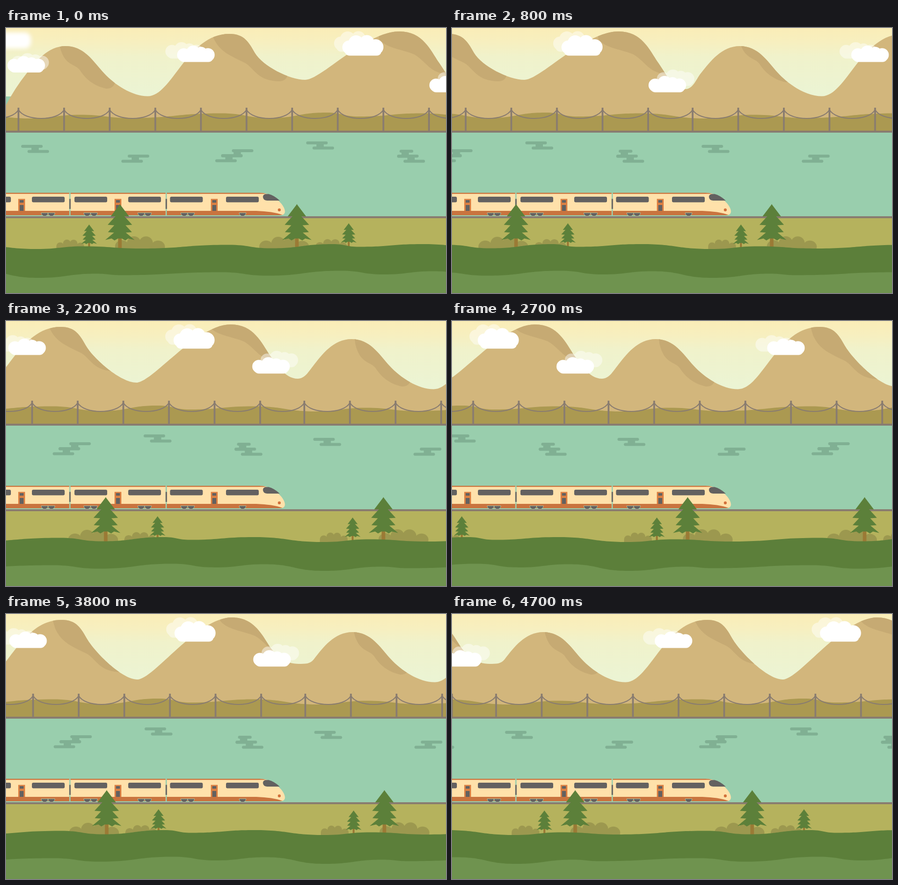
An HTML page that plays this animation: 900x542 px, repeating every 4.8 s.

```html
<!DOCTYPE html>
<html lang="en">
<head>
<meta charset="utf-8">
<title>Train by the lake</title>
<style>
  html, body { margin: 0; width: 100%; height: 100%; overflow: hidden; background: #99cead; }
  svg { display: block; width: 900px; height: 542px; }
  .strip { animation: pass 4.8s steps(48) infinite; }
  @keyframes pass { to { transform: translateX(-2784px); } }
</style>
</head>
<body>
<svg viewBox="0 0 900 542">
  <defs>
    <linearGradient id="sky" x1="0" y1="0" x2="0" y2="1">
      <stop offset="0" stop-color="#faedb7"/>
      <stop offset=".2" stop-color="#f7efbf"/>
      <stop offset=".42" stop-color="#f0f2cb"/>
      <stop offset="1" stop-color="#ebf4d4"/>
    </linearGradient>
    <filter id="soft" x="-50%" y="-50%" width="200%" height="200%"><feGaussianBlur stdDeviation="4"/></filter>
    <clipPath id="massif"><path id="massifPath"/></clipPath>
    <g id="puff" fill="#fff">
      <circle cx="13.5" cy="-14.5" r="13.5"/>
      <circle cx="33" cy="-18.5" r="15"/>
      <circle cx="49" cy="-18" r="13"/>
      <circle cx="63" cy="-14.5" r="13.8"/>
      <path d="M13-16H66L72-4Q69 0 64 0H14Q8 0 5-5Z"/>
    </g>
    <g id="bigPuff" fill="#fff">
      <circle cx="14" cy="-17" r="14"/>
      <circle cx="28" cy="-26" r="15.5"/>
      <circle cx="50" cy="-28" r="14"/>
      <circle cx="68" cy="-17.5" r="16"/>
      <path d="M14-20H70L79-5Q76 0 70 0H15Q9 0 6-5Z"/>
    </g>
    <path id="halfTree" d="M-.3 0H0L19 25L9 24.5L25 42L11.500 43L24.500 57L12 58L30 73L17 70L11 74L4 70H-.3Z"/>
    <g id="tree" fill="#5c803a">
      <path fill="#9b7a35" d="M-3.7 66H3.7V92H-3.7Z"/>
      <use href="#halfTree"/>
      <use href="#halfTree" transform="scale(-1 1)"/>
    </g>
    <g id="door">
      <path fill="#db8043" d="M0 349.5H14V374H0Z"/>
      <path fill="#636160" d="M3 352H11V357.3H3ZM3 362H11V374H3Z"/>
    </g>
  </defs>

  <rect width="900" height="140" fill="url(#sky)"/>
  <g id="far" class="strip"></g>
  <rect y="214" width="900" height="172" fill="#99cead"/>
  <rect y="210" width="900" height="4" fill="#897c70"/>
  <g id="lake" class="strip" fill="#80b093"></g>
  <rect y="389" width="900" height="100" fill="#b5b25d"/>
  <rect y="385" width="900" height="4" fill="#897c70"/>

  <g id="train">
    <path fill="#ffe1aa" d="M0 337H129.5V383H0ZM132 337H326.5V383H132ZM329 337H518C538 337 549 346 557 353
      C566 361 571 370 570.5 376Q570 381 565 382.5L560 383H329Z"/>
    <path fill="#c9743f" d="M0 337H129.5V339.3H0ZM132 337H326.5V339.3H132ZM329 337H518Q526 337 533 339.3H329Z
      M0 374H129.5V383H0ZM132 374H326.5V383H132ZM329 374H512Q545 375 566 382.2L560 383H329Z"/>
    <path fill="#636160" d="M129.5 349.5H132.3V370H129.5ZM326.5 349.5H329.3V370H326.5Z
      M532 339.5H537Q548 342 560 353H534Q525.5 352 525.5 345Q526 340 532 339.5Z"/>
    <circle cx="559" cy="372" r="3" fill="#d2703a"/>
  </g>
  <g id="near" class="strip"></g>
</svg>

<script>
const $ = id => document.getElementById(id);
const add = (id, html) => $(id).insertAdjacentHTML('beforeend', html);

// The scenery repeats; each layer's later tiles start with a small lead
const PITCH = 930, TILES = [0, 1, 2, 3];
const base = (k, lead) => k ? k * PITCH + lead : 0;
const land = k => base(k, 0.7);
const tiled = (lead, draw) => TILES.map(k =>
  `<g transform="translate(${base(k, lead)})">${draw(k)}</g>`).join('');

// Rolling ground from its crests and dips, level at each of them
const rolling = (turns, floor) => {
  const p = [-1, ...TILES].flatMap(k => turns.map(([x, y]) => [x + land(k), y]));
  const curves = p.slice(1).map(([x, y], i) => {
    const [px, py] = p[i], mid = (px + x) / 2;
    return `C${mid} ${py} ${mid} ${y} ${x} ${y}`;
  });
  return `M${p[0]}${curves.join('')}V${floor}H${p[0][0]}Z`;
};

// Three peaks per tile; the depth of the two valleys varies
const VALLEYS = [[106, 125], [126, 118], [134, 102], [134, 118]];
const range = ([mid, end], dx) => [
  [62, 68, 85, 37, 122, 37], [160, 37, 178, 68, 200, 92], [222, 116, 258, 139.5, 290, 139.5],
  [340, 139.5, 370, 12, 457, 12], [488, 12, 497, 30, 509, 51], [525, 78, 580, mid, 612, mid],
  [645, mid, 735, 7, 805, 7], [852, 7, 868, 45, 885, 70], [897, 86, 915, end, 942, end],
  [957, end, 965, 102, 972.7, 93]
].map(c => 'C' + c.map((v, i) => i % 2 ? v : v + dx)).join('');
const massif = `M-12 212V180L0 158Q18 123 42 93${VALLEYS.map((v, k) => range(v, land(k))).join('')}V212Z`;
$('massifPath').setAttribute('d', massif);

// Shaded slopes, nudged differently in each tile
const SHADES = [
  ['M102-20L110 38C120 78 140 72 151 86C162 103 178 118 205 124Q220 124 223 111V-20Z',
    ['0 0', '11 -13', '20 10', '15 0']],
  ['M412-20L424 20C438 50 460 57 490 72C508 83 515 109 560 109Q574 108 576 95V-20Z',
    ['0 0', '10 -6', '20 10', '8 -6']],
  ['M755-20L764 24C780 42 812 44 835 54C862 70 865 92 906 95V-20Z',
    ['0 0', '-3 -12', '18 -9', '8 -9']]
];
add('far', `<path fill="#d2b67c" d="${massif}"/>
  <g fill="#c6aa73" clip-path="url(#massif)">${tiled(.7, k => SHADES.map(([d, nudge]) =>
    `<path d="${d}" transform="translate(${nudge[k]})"/>`).join(''))}</g>`);

const HILLS = [[52, 185], [150, 177.5], [255, 184], [440, 174.5], [540, 184], [655, 173], [722, 181], [850, 174.5]];
add('far', `<path fill="#ab9951" d="${rolling(HILLS, 213)}"/>`);

// Poles and the wires hanging between them
const poles = [-68, ...TILES.flatMap(k => Array.from({ length: 10 }, (_, i) => land(k) + 25.5 + i * 93.3))];
const wire = (a, b) => `M${a} 167C${a + 12} 191 ${b - 12} 191 ${b} 167`;
add('far', `<g fill="none" stroke="#897c70">
  <path stroke-width="3.6" d="${poles.map(x => `M${x} 163V212`).join('')}"/>
  <path stroke-width="2" d="${poles.slice(1).map((x, i) => wire(poles[i], x)).join('')}"/></g>`);

// Clouds, each with a pale twin behind it
const cloud = (x, y, dx, dy, shape = 'puff') =>
  `<use href="#${shape}" x="${x + dx}" y="${y + dy}" opacity=".45"/><use href="#${shape}" x="${x}" y="${y}"/>`;
add('far', tiled(.7, k => cloud(350, 69.5, -24, -7) + cloud(688, 56.5, -17, -8, 'bigPuff') +
  (k ? cloud(849, 107.5, 17, -13) : cloud(866, 131.5, 17, -13))));
add('far', cloud(3, 91, 8, -6) +
  '<rect x="-20" y="9" width="71" height="33" rx="13" fill="#fff" filter="url(#soft)"/>');

// A ripple is two bars, the lower one shifted, joined where they overlap
const ripple = (x, y, shift, w = 44) => {
  const bar = (bx, by) => `<rect x="${bx}" y="${by}" width="${w}" height="6" rx="3"/>`;
  return bar(x, y) + bar(x + shift, y + 10.5) +
    `<rect x="${x + (w + shift) / 2 - 7.5}" y="${y + 3}" width="15" height="10"/>`;
};
add('lake', tiled(13.5, () => ripple(31, 239, 13) + ripple(249, 259, -13) + ripple(462, 248, -22) +
  ripple(440, 258, -12) + ripple(614, 232, 13) + ripple(805, 249, -5, 28) + ripple(800, 259, 13)));

// Train doors, windows and wheels
const wheel = x => `<path d="M${x - 7} 378H${x + 7}A7 7 0 0 1 ${x - 7} 378Z"
  fill="#636160" stroke="#b9d3ad" stroke-width=".8"/>`;
add('train', [25, 222, 419].map(x => `<use href="#door" x="${x}"/>`).join('') +
  [-57, 53, 140, 250, 335.5, 450].map(x =>
    `<rect x="${x}" y="345" width="67" height="11.5" rx="3" fill="#636160"/>`).join('') +
  [79, 166, 276.5, 364.5].map(x => wheel(x) + wheel(x + 14)).join('') + wheel(484));

// Trees and bushes
const tree = (x, y, s) => `<use href="#tree" transform="translate(${x} ${y}) scale(${s})"/>`;
const bush = (x, w, h) => [0, 1, 2, 3].map(i => {
  const r = w * .16, top = 450 - h * Math.sin(Math.PI * (.22 + .19 * i));
  return `<rect x="${x + w * .28 * i}" y="${top}" width="${r * 2}" height="${460 - top}" rx="${r}"/>`;
}).join('');
add('near', tiled(-45, () => `<g fill="#9c984f">${
  bush(103, 49, 18) + bush(223, 88, 25) + bush(518, 88, 24) + bush(633, 56, 19)}</g>` +
  tree(170, 402, .54) + tree(233, 360.5, 1) + tree(595, 360.5, 1) + tree(701, 399.5, .54)));

// Foreground meadows
const DARK = [[63, 452], [160, 446.5], [275, 451], [455, 443.5], [542, 450.5], [668, 442], [722, 447.5], [852, 442]];
const LIGHT = [[65, 511], [185, 502.5], [235, 505.5], [440, 499.5], [535, 506.5], [685, 496.5], [772, 504], [875, 497.5]];
add('near', `<path fill="#5c7f3a" d="${rolling(DARK, 545)}"/><path fill="#6f934f" d="${rolling(LIGHT, 545)}"/>`);
</script>
</body>
</html>
```
